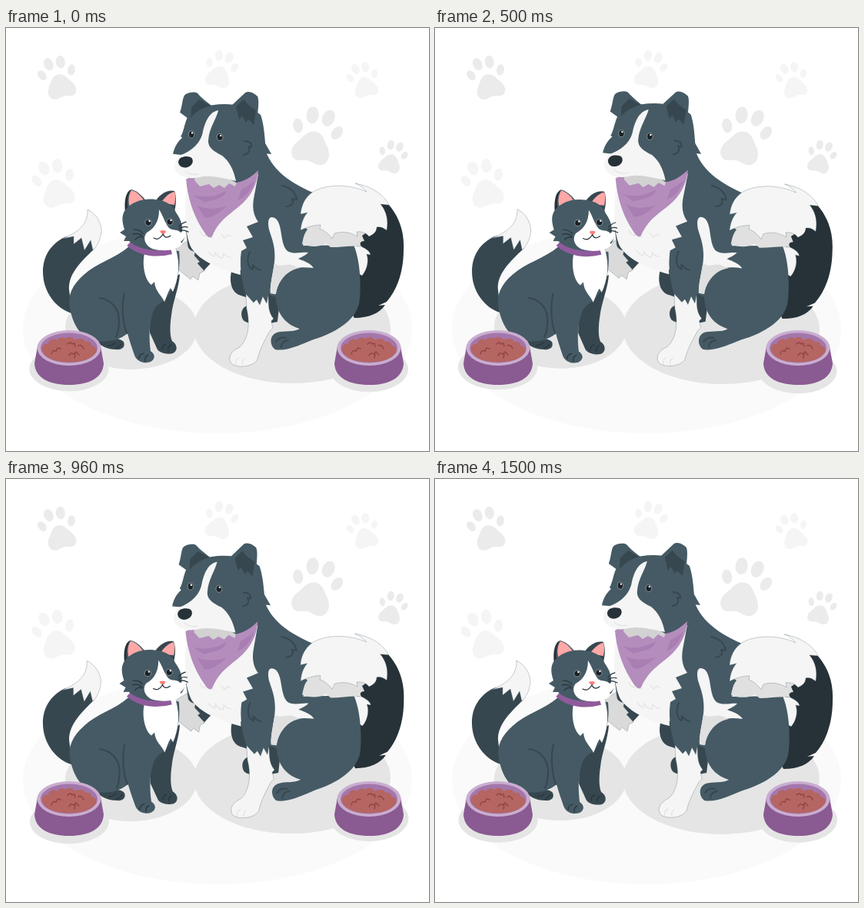
An HTML page for the animation above (1540 ms loop, 550 by 550 pixels).

```html
<!DOCTYPE html>
<html lang="en">
<head>
<meta charset="utf-8">
<title>Dog and cat</title>
<style>
  html, body { margin: 0; width: 100%; height: 100%; overflow: hidden; background: #fff; }
  svg { display: block; width: 100vw; height: 100vh; }
  .navy { fill: #455a64; }
  .dark { fill: #37474f; }
  .black { fill: #263238; }
  .white { fill: #f5f5f5; }
  .edge { stroke: #455a64; stroke-width: .3; }
  .grey { fill: #e0e0e0; }
  .pink { fill: #ffa8a7; }
  .line { fill: none; stroke: #37474f; stroke-width: 2; stroke-linecap: round; stroke-linejoin: round; }
  .thin { fill: none; stroke: #263238; stroke-width: 1.2; stroke-linecap: round; }
  .faint { fill: none; stroke: #e4e4e4; stroke-width: 1.3; stroke-linecap: round; }
  .eyes { fill: #192126; stroke: #d8d8d8; stroke-width: .5; }
</style>
</head>
<body>
<svg viewBox="0 0 550 550">
  <defs>
    <g id="paw">
      <ellipse cx="-26" cy="-8" rx="6.5" ry="9.5" transform="rotate(-22 -26 -8)"/>
      <ellipse cx="-11" cy="-26" rx="8" ry="11" transform="rotate(-8 -11 -26)"/>
      <ellipse cx="10" cy="-27" rx="8" ry="11" transform="rotate(10 10 -27)"/>
      <ellipse cx="25.5" cy="-11" rx="6.5" ry="9.5" transform="rotate(24 25.5 -11)"/>
      <path d="M-2-6C7-7 12 2 17 9C24 17 25 28 18 33C11 38 4 33-3 33C-11 33-17 39-23 33C-29 27-26 17-20 10C-15 3-12-5-2-6Z"/>
    </g>
    <g id="bowl">
      <path d="M41 414L37 436C38 455 56 464 82 464S126 455 127 436L123 414Z" fill="#8a5a92"/>
      <ellipse cx="82" cy="416" rx="41.500" ry="23" fill="#c9add0"/>
      <ellipse cx="82" cy="416" rx="37" ry="19.500" fill="#a377ac"/>
      <path d="M47 420C46 413 50 410 55 411C55 405 62 403 66 406C70 401 75 402 77 404C82 400 88 402 89 406C96 402 102 404 103 408C109 407 112 410 111 413C117 413 119 419 117 422C111 431 98 434.500 82 434.500S53 431 47 420Z" fill="#b56562"/>
      <path d="M59 424q1-6 6-4l2-4 4 1M80 411q4-4 6 0l3-1 1 4M82 426q2-5 6-2l3-3 4 4M89 429l1-5M101 417q-3-6-7-4" fill="none" stroke="#914345" stroke-width="1.400" stroke-linecap="round"/>
    </g>
  </defs>

  <ellipse cx="275" cy="391" rx="253" ry="136" fill="#fafafa"/>
  <g fill="#ebebeb">
    <use href="#paw" transform="translate(67.500 65) rotate(-14) scale(-.75 .75)"/>
    <use href="#paw" transform="translate(403 141) rotate(14)"/>
    <use href="#paw" transform="translate(502.500 168) rotate(15) scale(.57)"/>
  </g>
  <g fill="#f5f5f5">
    <use href="#paw" transform="translate(279.500 54) rotate(15) scale(.65)"/>
    <use href="#paw" transform="translate(464.500 68) rotate(-14) scale(-.62 .62)"/>
    <use href="#paw" transform="translate(63 202.500) rotate(-14) scale(-.84 .84)"/>
  </g>

  <g data-pivot="277 395" fill="#e5e5e5">
    <ellipse cx="82" cy="443.500" rx="51.500" ry="29"/>
    <ellipse cx="472" cy="443.500" rx="51" ry="29.500"/>
    <ellipse cx="163" cy="390" rx="86" ry="54"/>
    <ellipse cx="372" cy="390" rx="128" ry="72"/>
  </g>

  <g data-pivot="366 261">
    <path class="black" d="M484 226L497 229C512 246 518 266 517 288C517 316 509 340 495 356L484 361L493 360C486 371 472 377 453 377L440 350L456 284L460 264Z"/>
    <path class="dark" d="M293 317C290 332 294 345 306 348L318 352L314 361C304 364 305 377 310 381C318 386 335 386 353 382L358 340L330 310Z"/>
    <path class="dark" d="M234 264L241 268C244 290 254 301 266 306L256 317L240 310Z"/>
    <path class="edge" fill="#dadada" d="M221 286L236 277C235 284 237 289 246 291L245 296L252 304L249 306L258 316L252 319L250 328L243 323L240 327L224 314Z"/>
    <path class="white edge" d="M448 283L462 284C468 287 473 290 474 295L469 294C472 302 470 314 463 322L456 318Z"/>
    <path class="navy" d="M335 150C340 178 362 198 399 214L400 262L386 283L452 282C460 300 462 330 460 352C459 378 430 396 400 405C385 411 365 421 350 418C343 413 342 400 352 396C362 393 374 396 382 391C362 385 352 370 351 350L341 346L339 358L334 349L330 360L326 353L322 357L312 347C306 330 304 310 305 290L290 205Z"/>
    <path class="white" d="M236 200C231 240 232 268 241 286C252 303 278 314 305 321C304 308 305 298 306 290L313 286L308 276L321 272L313 258L328 252C322 244 320 234 322 222L328 190Z"/>
    <path class="faint" d="M252 264q2 6 7 7l1-5q3 7 9 7M263 291q4 5 8 6l1-5q4 7 10 7l1-6q4 5 9 5M280 268l4 5 4-4 4 2"/>
    <path class="white" d="M345 246C352 246 355 252 357 262C359 274 360 285 366 290C374 295 385 291 393 292C389 296 384 298 380 300C388 303 396 306 400 312C390 311 380 310 373 314C360 320 352 335 351 346L344 345C343 335 347 320 349 305C351 285 346 275 342 262C340 252 341 247 345 246Z"/>
    <path class="grey" d="M349 306C356 312 363 306 372 308L382 312C364 315 353 331 351 346L344 345C343 335 347 320 349 306Z"/>
    <path class="white edge" d="M312 346L322 357L326 353L330 360L334 349L339 358L341 347C342 358 340 368 348 378L345 381L347 390L343 394C336 407 330 418 327 431C322 441 300 443 293 436C288 428 293 420 304 415C315 405 318 385 313 365Z"/>
    <path class="faint" d="M299 438q-2-6 4-9M308 439q-2-6 3-9"/>
    <path class="line" d="M351 408q5-7 13-5M358 415q0-8 9-9"/>
    <path class="line" d="M359 205C369 207 377 214 378 223L372 222C375 227 372 231 365 232M317 291C312 302 315 312 321 314L321 308C324 312 327 314 331 315"/>
    <path class="grey" d="M384 256L392 262C387 268 386 276 385 281C396 285 407 285 416 280L422 285C438 285 451 282 462 284C459 280 461 277 466 277L463 270L480 258V235L410 240Z"/>
    <path class="white edge" d="M399 213C418 202 448 203 469 213C465 208 460 204 454 202C477 206 492 218 498 230L487 229C496 240 497 252 495 263C490 259 486 258 482 259C482 264 479 268 472 271C468 266 462 264 456 265L457 271C447 265 437 264 427 267L424 274C420 268 414 263 408 261L409 256C400 256 391 259 383 263C384 251 389 243 392 240L383 242C384 230 389 220 399 213Z"/>

    <path d="M234 197L250 188L328 185C327 202 319 219 303 232C287 245 276 252 268 271Q265 274 261 270C249 254 237 230 234 197Z" fill="#b48dbd"/>
    <path d="M243 217C258 222 274 219 287 211C283 224 270 222 258 227ZM248 230C260 238 276 234 287 232C277 240 267 249 258 246ZM306 210C311 207 319 203 323 198C319 212 310 220 301 224Z" fill="#a87eb3"/>
    <path fill="#d2d2d2" d="M247 188L301 196L298 206L290 202L284 208L277 204L270 208L264 203L252 206L245 198Z"/>
    <path class="navy" d="M237 114C245 104 265 99 284 99C300 99 320 103 331 113C335 125 336 138 337 150L345 164L335 163C336 172 331 180 328 185C318 195 308 200 299 201C285 190 250 190 236 166L217 164C219 155 223 148 229 143L227 141C231 136 232 122 237 114Z"/>
    <path class="white" d="M276 107C264 109 259 122 256 134C254 148 243 160 225 166C219 174 217 181 221 186C226 195 240 197 252 194C264 191 280 195 299 199C296 185 291 174 281 166C268 160 262 154 263 146C264 130 273 119 276 107Z"/>
    <path class="faint" d="M233 186q6 6 17 4"/>
    <path class="navy" d="M237 118L226 110C230 99 229 88 234 86C240 83 246 83 249 85C255 92 262 97 267 101C255 104 245 110 240 122Z"/>
    <path class="dark" d="M251 93L241 103L240 117C247 108 257 103 266 101Z"/>
    <path class="navy" d="M294 100L311 84C316 81 323 85 327 89C330 97 326 110 327 126L313 122Z"/>
    <path class="dark" d="M309 93L299 102L303 119L307 114L312 123L315 119L322 126L325 107C319 104 313 99 309 93Z"/>
    <path class="line" d="M310 147C316 147 320 150 319 155L315 154C318 160 315 164 309 165"/>
    <path class="black" d="M224 174C225 167 234 166 240 168C245 171 243 179 236 181C230 183 224 180 224 174Z"/>
    <g class="eyes">
      <ellipse cx="241" cy="138.500" rx="3.600" ry="4.500"/>
      <ellipse cx="278" cy="142" rx="3.800" ry="4.500"/>
    </g>
    <circle cx="242" cy="136.500" r="1.200" fill="#fff"/>
    <circle cx="279" cy="140" r="1.200" fill="#fff"/>
  </g>

  <g data-pivot="143 322">
    <path class="dark" d="M76 272C58 281 48 297 48 317C48 343 65 365 86 371L82 340C81 321 95 306 115 287L108 264Z"/>
    <path class="edge" fill="#f5f5f5" d="M106 236C118 242 124 254 124 264C123 275 119 283 113 289L110 276L102 289L98 273L88 281L88 271L73 274C91 267 107 257 106 236Z"/>
    <path class="dark" d="M188 340L226 320C225 338 217 355 215 374C213 387 213 400 216 407C223 411 224 420 217 423C208 425 198 422 196 416L187 396Z"/>
    <path class="dark" d="M118 398C130 405 147 401 153 408C156 415 150 419 143 418C132 418 124 414 116 406Z"/>
    <path class="navy" d="M160 284C142 300 118 305 101 321C86 334 80 348 83 363C86 383 97 404 116 407C132 409 148 406 158 397C161 408 164 416 167 425C170 434 180 437 188 434C195 430 194 424 188 420C186 402 186 388 190 374C192 365 196 360 206 354C220 340 228 318 225 290Z"/>
    <path class="line" d="M122 351C136 353 147 364 147 380C147 389 146 396 143 402M154 345C150 362 152 384 157 397"/>
    <path class="thin" d="M173 430q0-6 6-7M181 433q-1-6 4-8M203 418q0-6 5-7M211 420q-1-6 4-8M133 413q6 0 9-4M143 416q4-1 7-5"/>
    <path fill="#fff" d="M181 289C176 306 180 327 189 334L193 330C194 343 203 348 206 356C209 350 210 344 214 338L217 343C224 327 227 309 221 288Z"/>
    <path d="M160 280C174 293 196 295 215 290" fill="none" stroke="#8f5b9c" stroke-width="8"/>
    <path class="black" d="M155 240C153 224 156 212 163 210L170 232Z"/>
    <path class="navy" d="M163 210C171 212 178 219 183 226L170 240L158 233C157 223 159 214 163 210Z"/>
    <path class="pink" d="M163 211C171 213 177 220 181 227C173 227 167 231 162 236C158 227 159 217 163 211Z"/>
    <path class="dark" d="M195 224C202 214 212 210 219 212C222 220 221 230 219 238Z"/>
    <path class="pink" d="M203 225C208 218 215 213 219 213C221 219 220 225 219 230C213 229 207 229 203 225Z"/>
    <path class="navy" d="M154 238C163 225 180 221 194 223C208 224 218 231 221 240C227 248 230 257 229 264L232 272C230 282 218 290 199 289C183 289 168 285 160 277L153 277L156 271L148 266L154 262C151 253 150 245 154 238Z"/>
    <path fill="#fff" d="M199 236C199 250 194 260 183 266C177 273 181 283 190 287C204 291 221 290 229 281L227 278C233 274 234 268 232 263L227 266C223 261 217 264 212 260C206 253 204 243 199 236Z"/>
    <g class="eyes">
      <circle cx="185" cy="253" r="4"/>
      <circle cx="213" cy="252" r="4"/>
    </g>
    <circle cx="186.500" cy="251" r="1.200" fill="#fff"/>
    <circle cx="214.500" cy="250" r="1.200" fill="#fff"/>
    <path d="M200 264Q204 262 208 264Q207 268 204 268Q201 267 200 264Z" fill="#ff7d78"/>
    <path class="thin" d="M192 273Q199 277 204 268Q207 275 214 270"/>
    <path class="thin" d="M166 262Q174 262 178 267M165 268Q172 266 177 270M168 275Q172 270 178 272M225 258Q229 253 234 252M225 261Q231 257 236 259M226 263Q231 262 237 265"/>
  </g>

  <use href="#bowl"/>
  <use href="#bowl" x="390"/>
</svg>
<script>
  const LOOP = 1540, LEAD = 20;
  const swaying = document.querySelectorAll('[data-pivot]');

  // Sway in degrees: 0, +1 at a quarter, -1 at three quarters, linear between.
  function sway(p) {
    return p < .25 ? 4 * p : p < .75 ? 2 - 4 * p : 4 * p - 4;
  }

  function draw() {
    const angle = sway((performance.now() + LEAD) % LOOP / LOOP);
    for (const part of swaying) {
      part.setAttribute('transform', `rotate(${angle} ${part.dataset.pivot})`);
    }
    requestAnimationFrame(draw);
  }
  draw();
</script>
</body>
</html>
```
